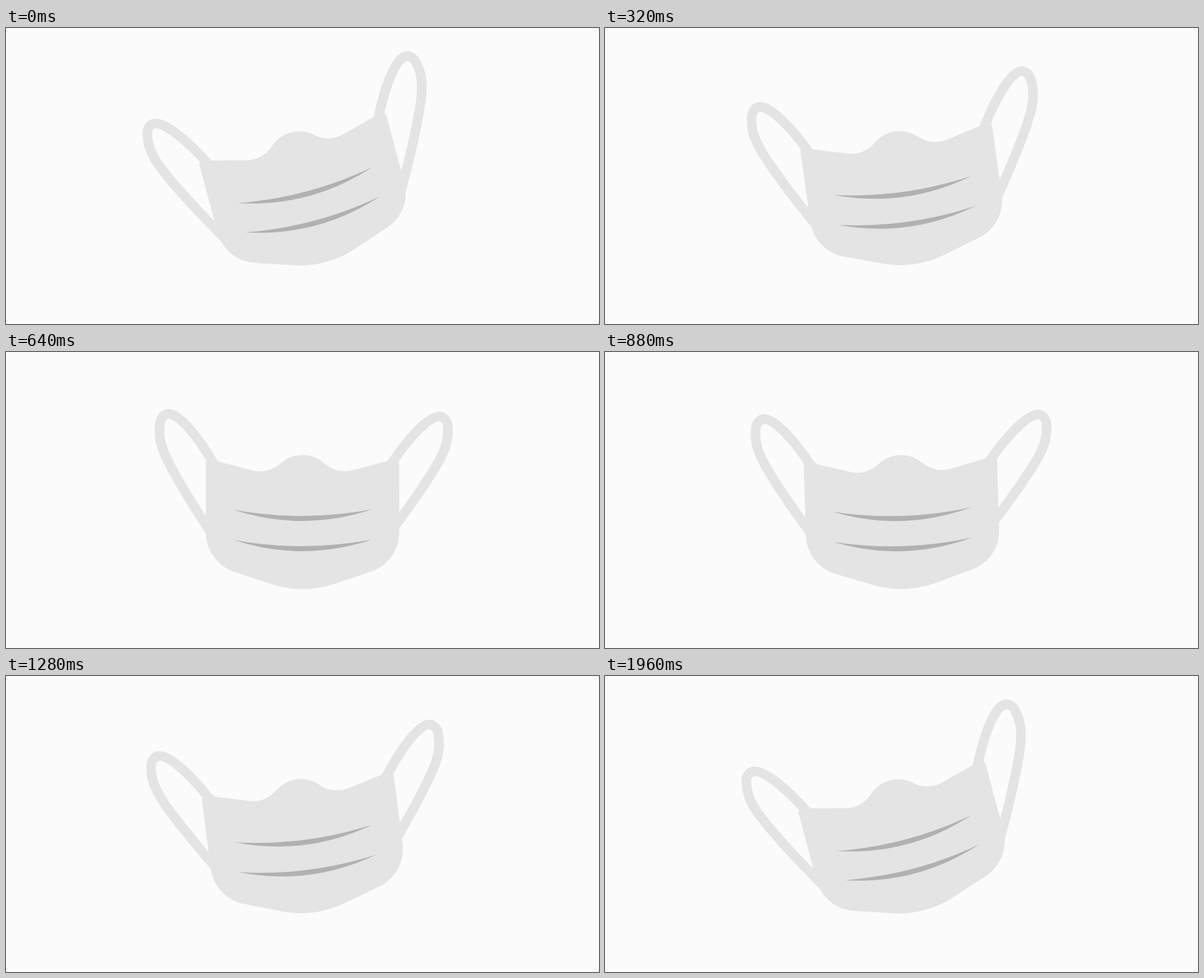
Recreate the animation shown at these times as an HTML page. Size 1058 by 529 pixels, loop 2.04 s.

```html
<!DOCTYPE html>
<html lang="en">
<head>
<meta charset="utf-8">
<title>Swinging face mask</title>
<style>
  html, body { margin: 0; width: 100%; height: 100%; overflow: hidden; background: #fbfbfb; }
  svg { display: block; width: 100%; height: 100%; }
  .cloth { fill: #e4e4e4; }
  .strap { fill: none; stroke: #e4e4e4; stroke-width: 17.2; }
  .fold { fill: #b1b1b1; }
</style>
</head>
<body>
<svg viewBox="-529 -264.5 1058 529">
  <defs>
    <path id="loop" class="strap" d="M155 -62 L160 -70 C176 -102 207 -153 229.7 -158.8
      A12 12 0 0 1 236.1 -158.7 A19.3 19.3 0 0 1 248.2 -143.6 A92 92 0 0 1 246.1 -96
      C240 -73 211 -12 160 76"/>
    <path id="pleat" class="fold" d="M-124 17 Q0 40 124 17 Q0 58 -124 17 Z"/>
  </defs>
  <g id="mask">
    <g transform="scale(-1 1)"><use id="left" href="#loop"/></g>
    <use id="right" href="#loop"/>
    <path class="cloth" d="M163 -72.5 Q171.5 -74.8 172.5 -66 V58
      A74 74 0 0 1 122.5 128 L58 149.5 A178 178 0 0 1 -58 149.5 L-122.5 128
      A74 74 0 0 1 -172.5 58 V-66 Q-171.5 -74.8 -163 -72.5 L-90.2 -53.2
      A55 55 0 0 0 -39 -65.5 A58 58 0 0 1 39 -65.5 A55 55 0 0 0 90.2 -53.2 Z"/>
    <use href="#pleat"/>
    <use href="#pleat" y="54"/>
  </g>
</svg>
<script>
  const LOOP = 2040, STEP = 40, CYCLE = 2000;
  const [mask, left, right] = ['mask', 'left', 'right'].map(id => document.getElementById(id));
  const smooth = u => u * u * (3 - 2 * u);

  // Eases through equally spaced values over one cycle.
  function keyed(values, t) {
    const pos = t / CYCLE * (values.length - 1);
    const i = Math.min(Math.floor(pos), values.length - 2);
    return values[i] + (values[i + 1] - values[i]) * smooth(pos - i);
  }

  function rotate(el, angle, pivot = '0 0') {
    el.setAttribute('transform', `rotate(${angle} ${pivot})`);
  }

  function draw(now) {
    // Motion advances in 40 ms steps and rests briefly at both ends.
    const step = Math.floor(now % LOOP / STEP) * STEP;
    const t = step < 80 ? 0 : Math.min(step, 1960);
    rotate(mask, keyed([-15, 0, -7.5, -15], t));
    rotate(left, keyed([0, 5.2, 0], t), '160 -52');
    rotate(right, keyed([0, 10.4, 0], t), '160 -52');
  }

  const start = performance.now();
  function tick() {
    draw(performance.now() - start);
    requestAnimationFrame(tick);
  }
  tick();
</script>
</body>
</html>
```
